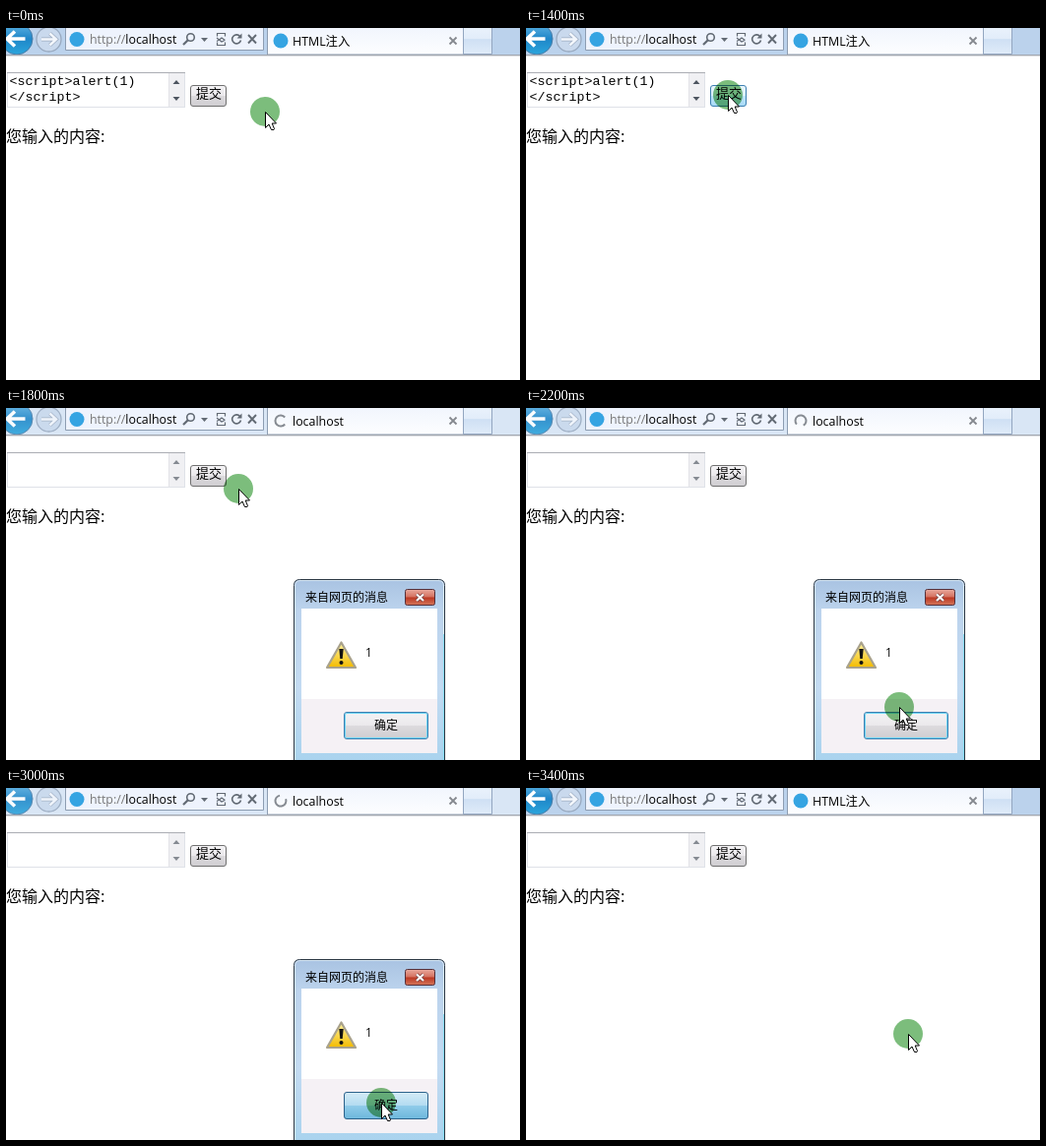
These frames come from a looping animation (522x358 px, 3600 ms). An HTML page:

```html
<!DOCTYPE html>
<html lang="zh">
<head>
<meta charset="utf-8">
<style>
html, body { margin: 0; width: 100%; height: 100%; overflow: hidden; background: #fff; }
svg { display: block; width: 522px; height: 358px; }
text { white-space: pre; fill: #000; }
.ui { font: 12.4px "Open Sans", "Noto Sans CJK SC", "Noto Sans CJK", sans-serif; }
.cjk { font: 12px "Noto Sans CJK SC", "Noto Sans CJK", sans-serif; }
.mono { font: 13.33px "Liberation Mono", monospace; }
.line { fill: none; stroke: #626a74; stroke-width: 1.6; }
#spot { mix-blend-mode: multiply; }
</style>
</head>
<body>
<svg viewBox="0 0 522 358">
  <defs>
    <linearGradient id="tab" x2="0" y2="1"><stop stop-color="#f1f5fd"/><stop offset="1" stop-color="#fdfeff"/></linearGradient>
    <linearGradient id="plus" x2="0" y2="1"><stop stop-color="#eaf2fc"/><stop offset=".42" stop-color="#e2edfa"/><stop offset=".46" stop-color="#cfe0f4"/><stop offset="1" stop-color="#e0ecf9"/></linearGradient>
    <linearGradient id="back" x2="0" y2="1"><stop stop-color="#5fb4e4"/><stop offset=".5" stop-color="#1f86c8"/><stop offset="1" stop-color="#2ba5dc"/></linearGradient>
    <linearGradient id="normal" x2="0" y2="1"><stop stop-color="#f4f3f5"/><stop offset=".48" stop-color="#ebe9ec"/><stop offset=".52" stop-color="#dcdadd"/><stop offset="1" stop-color="#cfcdd1"/></linearGradient>
    <linearGradient id="hover" x2="0" y2="1"><stop stop-color="#eaf6fd"/><stop offset=".48" stop-color="#d9f0fc"/><stop offset=".52" stop-color="#bee6fd"/><stop offset="1" stop-color="#a7d9f5"/></linearGradient>
    <linearGradient id="pressed" x2="0" y2="1"><stop stop-color="#d5ebf6"/><stop offset=".48" stop-color="#b4dcf1"/><stop offset=".52" stop-color="#8fcbe9"/><stop offset="1" stop-color="#6db7dc"/></linearGradient>
    <linearGradient id="frame" x2="0" y2="1"><stop stop-color="#a9c3e2"/><stop offset=".17" stop-color="#bcd3ed"/><stop offset=".6" stop-color="#c3dbf2"/><stop offset="1" stop-color="#a9d3ee"/></linearGradient>
    <linearGradient id="red" x2="0" y2="1"><stop stop-color="#e9a99d"/><stop offset=".48" stop-color="#d4705f"/><stop offset=".52" stop-color="#bb3722"/><stop offset="1" stop-color="#d4765a"/></linearGradient>
    <linearGradient id="warn" x2="0" y2="1"><stop stop-color="#fff3a0"/><stop offset="1" stop-color="#f3bb00"/></linearGradient>
  </defs>

  <rect width="522" height="358" fill="#fff"/>
  <rect id="bar" width="522" height="27"/>

  <g id="nav">
    <circle cx="11" cy="11" r="16" fill="url(#back)" stroke="#4a7ca6"/>
    <path d="M19.500 11H1.500M9 3.500L1 11L9 18.500" fill="none" stroke="#fff" stroke-width="3.600"/>
    <circle cx="43.500" cy="11.500" r="12.500" fill="#c9d9ed" stroke="#98a9bf" stroke-width="1.300"/>
    <path d="M36 11.500H50M44.500 5.500L51 11.500L44.500 17.500" fill="none" stroke="#9cabc0" stroke-width="3.800"/>
    <path d="M36 11.500H50M44.500 5.500L51 11.500L44.500 17.500" fill="none" stroke="#f3f7fc" stroke-width="2.400"/>
  </g>
  <path d="M60.500 -1V22.500H261.500V-1" fill="#eef3fd" stroke="#8d9db2"/>
  <circle cx="72" cy="11.500" r="7.500" fill="#35a4e2"/>
  <text class="ui" x="85" y="16"><tspan fill="#787878">http://</tspan>localhost</text>
  <g class="line">
    <circle cx="187.500" cy="9.500" r="3.800"/><path d="M184.800 12.300L180 17" stroke-width="2.200"/>
    <path d="M214.500 8.500V5.500H222.500V8.500M214.500 14.500V17.500H222.500V14.500M214 10l2.500 2 2.500-2 3.500 2.500M214 13.500l2.500-1.500 2.500 2 3-1.500" stroke-width="1.200"/>
    <path d="M238 9A4.500 4.500 0 1 0 238.500 12.500"/>
    <path d="M246 7l8 8.500M254 7l-8 8.500" stroke-width="1.900"/>
  </g>
  <path d="M198 10h7l-3.500 4zM239.500 5.500v5h-5z" fill="#626a74"/>

  <path d="M265.500 -1V27H464.500V-1" fill="url(#tab)" stroke="#8d9db2"/>
  <path d="M464.500 -1V26.500H493.500V-1" fill="url(#plus)" stroke="#93a6c0"/>
  <path d="M0 27.500H522" stroke="#a3a8b0"/>
  <path d="M0 28.500H522" stroke="#dcdee2"/>
  <path d="M450.500 9.500l7 7M457.500 9.500l-7 7" stroke="#85898f" stroke-width="1.800"/>
  <circle id="icon" cx="279" cy="13" r="7.500" fill="#35a4e2"/>
  <path id="spinner" d="M283.200 16.500A5.500 5.500 0 1 1 283.200 9.500" fill="none" stroke="#868b92" stroke-width="2"/>
  <text id="title" class="ui" x="291" y="18"></text>

  <rect x="1.500" y="45.500" width="180" height="35" fill="#fff" stroke="#dfe2e8"/>
  <path d="M1 45.500H182" stroke="#abadb3"/>
  <rect x="165" y="46" width="16" height="34" fill="#f0f0f3"/>
  <path d="M165.500 46V80" stroke="#e2e2e7"/>
  <path id="arrows" d="M169.500 57h7l-3.500-4zM169.500 70h7l-3.500 4z"/>
  <g id="input" class="mono"><text x="3.500" y="58">&lt;script&gt;alert(1)</text><text x="3.500" y="74">&lt;/script&gt;</text></g>
  <rect id="submit" x="187.500" y="58.500" width="36" height="21" rx="2.500"/>
  <text class="cjk" style="font-size:13px" x="193" y="70.500">提交</text>
  <text class="cjk" style="font-size:16px;font-weight:300" x="0" y="116">您输入的内容:</text>

  <g id="dialog">
    <path d="M292.500 360V180.500Q292.500 174.500 298.500 174.500H439.500Q445.500 174.500 445.500 180.500V360" fill="url(#frame)" stroke="#2b3743"/>
    <path d="M293.500 359V181Q293.500 175.500 299 175.500H439Q444.500 175.500 444.500 181V359" fill="none" stroke="#e0effb" stroke-opacity=".8"/>
    <path d="M444.500 230V358" stroke="#5fd0ee" stroke-opacity=".7"/>
    <text class="cjk" x="304" y="196.500">来自网页的消息</text>
    <rect x="405.500" y="184.500" width="30" height="16" rx="2" fill="url(#red)" stroke="#55303a"/>
    <path d="M417 189.500l7 6.500M424 189.500l-7 6.500" stroke="#713a3a" stroke-width="3.600"/>
    <path d="M417 189.500l7 6.500M424 189.500l-7 6.500" stroke="#fff" stroke-width="2.200"/>
    <rect x="300" y="204" width="138" height="147" fill="#f5f1f5"/>
    <rect x="300" y="204" width="138" height="92" fill="#fff"/>
    <path d="M340.500 238.500L355 264H326Z" fill="url(#warn)" stroke="#a9a28c" stroke-width="2.200" stroke-linejoin="round"/>
    <path d="M338.300 245h4.400l-1 10h-2.400z" fill="#111"/><circle cx="340.500" cy="259" r="2" fill="#111"/>
    <text class="ui" style="font-size:12px" x="365" y="253">1</text>
    <rect id="ok" x="343.500" y="309.500" width="85" height="27" rx="2.500"/>
    <rect id="glow" x="344.500" y="310.500" width="83" height="25" rx="1.500" fill="none" stroke="#6fd5f2"/>
    <text class="cjk" x="386" y="327" text-anchor="middle">确定</text>
  </g>

  <g id="pointer">
    <circle id="spot" fill="#7cbd7c"/>
    <path d="M.5 .5V16.500L4 13L6.500 18.500H9L9.500 17.500L7.200 12H11.500Z" fill="#fff" stroke="#000"/>
  </g>
</svg>
<script>
const LOOP = 3600;
const STEP = 200;
const el = id => document.getElementById(id);
const show = (id, on) => el(id).setAttribute("display", on ? "inline" : "none");
const set = (id, attrs) => {
  for (const key in attrs) el(id).setAttribute(key, attrs[key]);
};

// Pointer stops: start time, x, y
const stops = [
  [0, 263, 85], [200, 226, 75], [400, 202, 69], [1400, 205, 68],
  [1800, 236, 82], [2000, 372, 268], [2200, 379, 304],
  [2800, 381, 320], [3200, 387, 295], [3400, 388, 250]
];
const borders = { normal: "#707070", hover: "#3c7fb1", pressed: "#2c628b" };

function paintButton(id, state, border = borders[state]) {
  set(id, { fill: `url(#${state})`, stroke: border });
}

function draw(time) {
  const t = Math.floor(time % LOOP / STEP) * STEP;
  const within = (from, to) => t >= from && t < to;
  const loading = within(1600, 3200);
  const modal = within(1800, 3200);
  const clicking = within(1600, 1800) || within(2400, 2600);

  set("bar", { fill: modal ? "#d9e6f5" : "#bbd2ec" });
  set("nav", { opacity: modal ? 0.88 : 1 });
  show("icon", !loading);
  show("spinner", loading);
  set("spinner", { transform: `rotate(${(t - 1800) / 4} 279 13)` });
  el("title").textContent = loading ? "localhost" : "HTML注入";

  show("input", t < 1800);
  set("arrows", { fill: t < 1800 ? "#4d5560" : "#858a92" });
  paintButton("submit", within(400, 1600) ? "hover" : within(1600, 1800) ? "pressed" : "normal");

  show("dialog", modal);
  const state = t >= 3000 ? "pressed" : t >= 2800 ? "hover" : "normal";
  paintButton("ok", state, state === "normal" ? "#3c7fb1" : borders[state]);
  show("glow", state === "normal");

  const [, x, y] = stops.filter(stop => stop[0] <= t).pop();
  set("pointer", { transform: `translate(${x} ${y})` });
  set("spot", { r: clicking ? 15.8 : 15 });
}

function tick() {
  draw(performance.now());
  requestAnimationFrame(tick);
}
tick();
</script>
</body>
</html>
```
